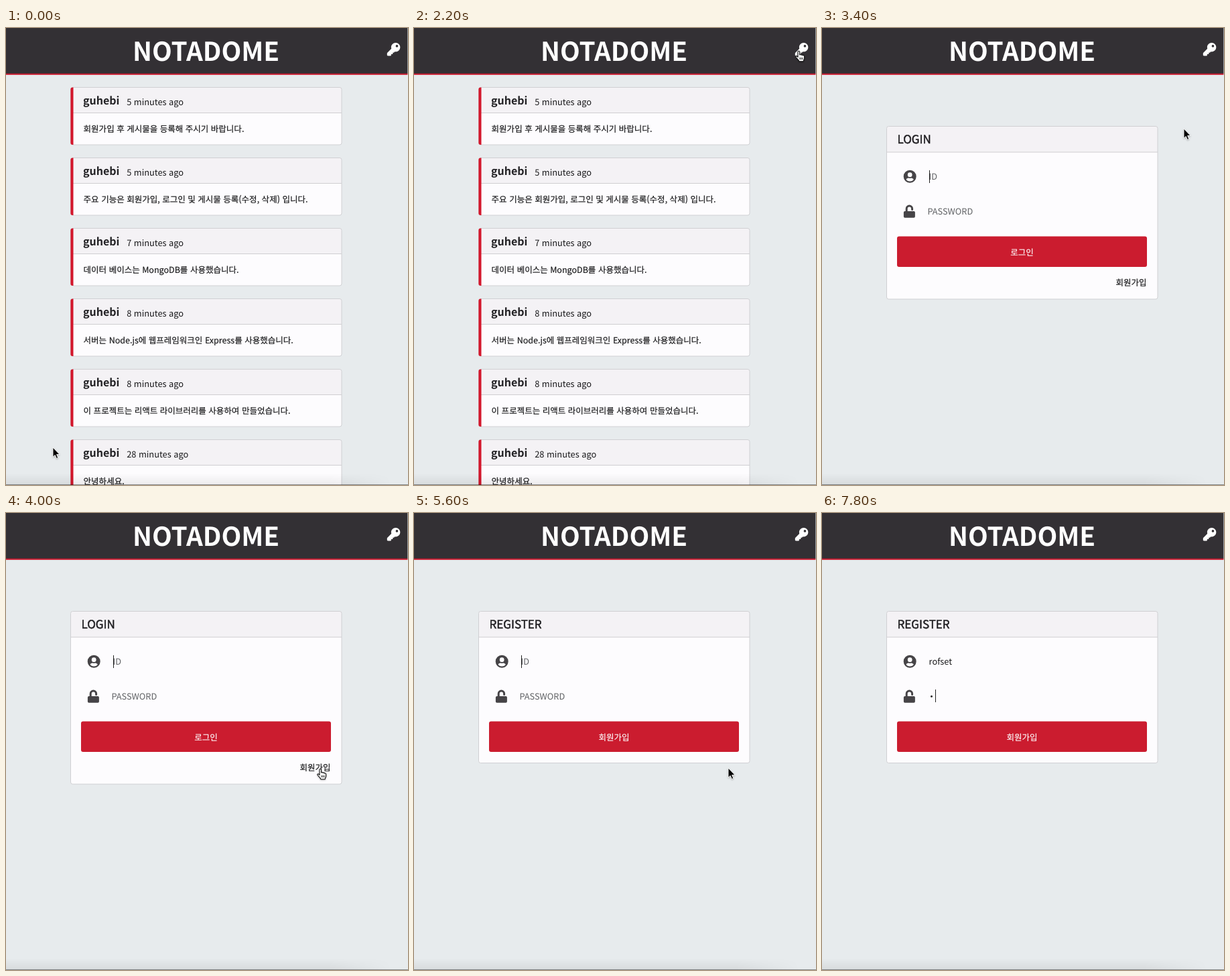
An HTML page that plays this animation: 600 by 681 pixels, repeating every 8 s.

```html
<!DOCTYPE html>
<html lang="ko">
<head>
<meta charset="utf-8">
<title>Memo board</title>
<style>
html, body { margin: 0; width: 100%; height: 100%; overflow: hidden; background: #e7ebed; }
svg { display: block; width: 600px; height: 681px; font: 12.8px "Noto Sans CJK KR", "Noto Sans KR", "Noto Sans CJK", sans-serif; text-rendering: geometricPrecision; }
text { fill: #19191b; white-space: pre; }
.name { font-size: 16px; font-weight: 700; fill: #232225; }
.body { font-size: 12.53px; stroke: #19191b; stroke-width: .18px; }
.head { font-size: 17px; fill: #1d1c1f; stroke: #1d1c1f; stroke-width: .45px; }
.hint { fill: #606265; }
.white { fill: #fff; }
.button { font-size: 12.53px; fill: #fff; stroke: #fff; stroke-width: .12px; }
.status { font: 11.7px Inter, sans-serif; fill: #8b8d90; }
</style>
</head>
<body>
<svg viewBox="0 0 600 681">
  <defs>
    <linearGradient id="shade" x1="0" y1="0" x2="0" y2="1">
      <stop offset="0" stop-opacity="0"/><stop offset="1" stop-opacity=".07"/>
    </linearGradient>
    <linearGradient id="fade">
      <stop offset=".8" stop-color="#fff"/><stop offset=".96" stop-color="#fff" stop-opacity="0"/>
    </linearGradient>
    <mask id="side"><rect y="660" width="600" height="21" fill="url(#fade)"/></mask>
    <filter id="soft" x="-50%" y="-50%" width="200%" height="200%">
      <feDropShadow dx="0" dy="1" stdDeviation="1" flood-opacity=".3"/>
    </filter>
  </defs>
  <rect width="600" height="681" fill="#e7ebed"/>
  <g id="page"></g>
  <rect width="599.400" height="68" fill="#333034"/>
  <rect y="67.800" width="599.400" height="2" fill="#c91a2e"/>
  <text x="298.5" y="48.5" text-anchor="middle" class="white" font-size="38.7" font-weight="700">NOTADOME</text>
  <path transform="translate(568.8 22) scale(.0381)" fill="#fff" d="M512 176C512 273 433 352 336 352c-11 0-22-1-33-3l-24 27a24 24 0 0 1-18 8H224v40c0 13-11 24-24 24h-40v40c0 13-11 24-24 24H24c-13 0-24-11-24-24v-78c0-6 2.500-12.500 7-17l162-162C163 214 160 195 160 176 160 79 239 0 336 0 433 0 512 79 512 176zM336 128a48 48 0 0 0 96 0 48 48 0 0 0-96 0z"/>
  <rect y="664" width="600" height="17" fill="url(#shade)" mask="url(#side)"/>
  <rect y="680" width="600" height="1" opacity=".42"/>
  <g id="status" filter="url(#soft)">
    <path id="tab" fill="#2a2b2e"/>
    <text id="url" class="status" x="0" y="680"></text>
  </g>
  <g id="arrow" filter="url(#soft)">
    <path d="M0 0V14.300L3.200 11.400 5.400 16.400 7.700 15.400 5.600 10.500H10Z" stroke="#fff" stroke-width=".9"/>
  </g>
  <g id="hand" filter="url(#soft)">
    <path fill="#fff" stroke="#111" stroke-width="1.100" stroke-linejoin="round" d="M4.200 10V2.200C4.200.4 6.800.4 6.800 2.200V6.500C6.800 5.600 9.200 5.600 9.200 7 9.300 6.100 11.500 6.300 11.500 7.600 11.800 6.900 13.800 7.200 13.800 8.800V11.500C13.800 13.500 12.500 14 12.300 16.300H6C5.500 14 2.500 12 1.100 9.900.5 8.800 2 8 3 8.800Z"/>
    <path stroke="#111" stroke-width=".9" d="M7.200 10.500v3.200M9.200 10.500v3.200M11.200 10.500v3.200"/>
  </g>
</svg>
<script>
const LOOP = 8000, STEP = 200;
const USER = "guhebi", LOGIN_ID = "rofset";
const posts = [
  [5, "회원가입 후 게시물을 등록해 주시기 바랍니다."],
  [5, "주요 기능은 회원가입, 로그인 및 게시물 등록(수정, 삭제) 입니다."],
  [7, "데이터 베이스는 MongoDB를 사용했습니다."],
  [8, "서버는 Node.js에 웹프레임워크인 Express를 사용했습니다."],
  [8, "이 프로젝트는 리액트 라이브러리를 사용하여 만들었습니다."],
  [28, "안녕하세요."]
];
// time, x, y of the pointer tip
const path = [
  [0, 70, 625], [600, 70, 625], [800, 122, 560], [1000, 290, 345], [1200, 396, 228],
  [1400, 396, 228], [1600, 432, 190], [1800, 525, 90], [2000, 573, 37], [2200, 574, 34],
  [3000, 574, 34], [3200, 566, 62], [3400, 540, 150], [3600, 506, 270], [3800, 478, 360],
  [4000, 469, 381], [4600, 469, 381], [4800, 469, 380], [LOOP, 469, 380]
];
const $ = id => document.getElementById(id);
const within = (t, a, b) => t >= a && t < b;
const show = (el, on) => el.style.display = on ? "" : "none";
const text = (x, y, s, cls = "", more = "") => `<text x="${x}" y="${y}" class="${cls}" ${more}>${s}</text>`;

function panel(y, h, line) {
  return `<rect x="96.500" y="${y}" width="404.500" height="${h}" rx="3" fill="#fdfcfe"/>
    <path d="M97 ${y + line}V${y + 3}q0-3 3-3H498q3 0 3 3V${y + line}Z" fill="#f4f2f5"/>
    <path d="M97 ${y + line}H501" stroke="#cfced1"/>
    <rect x="96.500" y="${y}" width="404.500" height="${h}" rx="3" fill="none" stroke="#d0d0d3"/>`;
}

function board() {
  return posts.map(([min, body], i) => {
    const y = Math.round(88.6 + i * 105.1) - .5;
    return panel(y, 85.5, 38) +
      `<path d="M100.500 ${y}V${y + 85.5}H99.400q-3 0-3-3V${y + 3}q0-3 3-3Z" fill="#d3172c"/>` +
      text(115, y + 25.5, USER, "name") +
      text(180.2, y + 26.3, min + " minutes ago") +
      text(115.6, y + 66.9, body, "body");
  }).join("");
}

const icons = `<g fill="#464447">
  <path fill-rule="evenodd" d="M121.700 221.200a9.500 9.500 0 0 1 19 0 9.500 9.500 0 0 1-19 0ZM127.800 218.700a3.400 3.400 0 0 0 6.800 0 3.400 3.400 0 0 0-6.800 0ZM125.600 225.900a7.300 7.300 0 0 0 11.200 0c-.7-1.400-2.100-2.300-3.800-2.300q-1.800.6-3.600 0c-1.700 0-3.100.9-3.800 2.300Z"/>
  <rect x="121.900" y="273" width="17" height="9.700" rx="1.800"/>
  <path d="M126.200 274V269.300a4.200 4.200 0 0 1 8.400 0V270.500" fill="none" stroke="#464447" stroke-width="3" stroke-linecap="round"/>
</g>`;

function form(t) {
  const register = t >= 4800;
  return panel(146.5, register ? 226 : 257.5, 38.5) +
    text(112.4, 172, register ? "REGISTER" : "LOGIN", "head") + icons +
    `<rect x="112" y="310.500" width="373" height="45.500" rx="3" fill="#cb1c2f"/>` +
    text(298.5, 339.3, register ? "회원가입" : "로그인", "button", 'text-anchor="middle"') +
    (register ? "" : text(484.6, 384, "회원가입", "body", 'text-anchor="end"')) +
    fields(t);
}

function typed(t) {
  if (t < 5800) return 0;
  if (t < 6600) return t < 6000 ? 1 : 2;
  return Math.min(6, 3 + Math.floor((t - 6600) / STEP));
}

function fields(t) {
  const n = typed(t), dot = t >= 7800;
  return (n ? text(159.6, 226.3, LOGIN_ID.slice(0, n), "", 'id="entry"') : text(159.6, 226.3, "ID", "hint")) +
    (dot ? '<circle cx="163.500" cy="273.300" r="1.500" fill="#222"/>' : text(157.4, 278, "PASSWORD", "hint")) +
    '<rect id="caret" width="1" height="19" fill="#222"/>';
}

function placeCaret(t) {
  const caret = $("caret"), entry = $("entry");
  if (!caret) return;
  const secret = t >= 7600;
  const x = secret ? (t >= 7800 ? 169 : 160) : 160 + (entry ? Math.round(entry.getComputedTextLength()) : 0);
  caret.setAttribute("x", x);
  caret.setAttribute("y", secret ? 263 : 212);
  const typing = within(t, 5800, 6400) || t >= 6600;
  show(caret, typing || Math.floor(t / 400) % 2 === 0);
}

function pointer(t) {
  const i = Math.max(1, path.findIndex(p => p[0] >= t));
  const [a, b] = [path[i - 1], path[i]];
  const k = (t - a[0]) / (b[0] - a[0]);
  const [x, y] = [1, 2].map(j => a[j] + (b[j] - a[j]) * k);
  const link = within(t, 2000, 3200) || within(t, 4000, 4800);
  show($("hand"), link);
  show($("arrow"), !link && t < 5800);
  $("arrow").setAttribute("transform", `translate(${x} ${y})`);
  $("hand").setAttribute("transform", `translate(${x - 5.2} ${y - .6})`);
}

function status(t) {
  const login = within(t, 2400, 3400), register = within(t, 4200, 5200);
  const w = login ? 119 : 135;
  show($("status"), login || register);
  $("status").setAttribute("opacity", t === 5000 ? .5 : 1);
  $("tab").setAttribute("d", `M0 665H${w - 4}q4 0 4 4V681H0Z`);
  $("url").textContent = "localhost:3000/" + (login ? "login" : "register");
}

let last = -1;
function draw(t) {
  if (t === last) return;
  last = t;
  $("page").innerHTML = t < 2400 ? board() : form(t);
  placeCaret(t);
  pointer(t);
  status(t);
}

function tick() {
  draw(Math.floor(performance.now() % LOOP / STEP) * STEP);
  requestAnimationFrame(tick);
}
tick();
</script>
</body>
</html>
```
